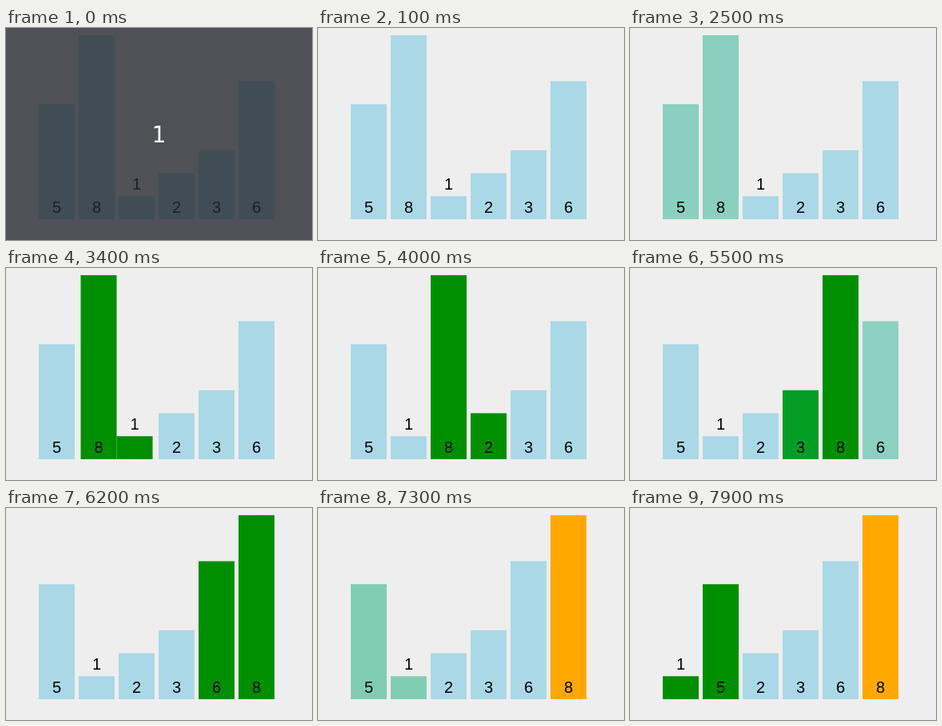
These frames come from a looping animation (383 px wide and 265 px high, 8 s). An HTML page:

```html
<!DOCTYPE html>
<html lang="en">
<head>
<meta charset="utf-8">
<title>Bubble sort</title>
<style>
  html, body { margin: 0; width: 100%; height: 100%; overflow: hidden; background: #eee; }
  svg { display: block; width: 383px; height: 265px; }
  text { text-anchor: middle; }
  .bar text { font: 20px "Liberation Sans", Arial, sans-serif; }
  #veil rect { fill: rgba(38, 40, 46, .79); }
  #veil text { font: 28px "DejaVu Sans", sans-serif; fill: #fff; }
</style>
</head>
<body>
<svg viewBox="0 0 383 265">
  <g id="bars"></g>
  <g id="veil">
    <rect width="383" height="265"/>
    <text x="191.5" y="143">1</text>
  </g>
</svg>
<script>
const LOOP = 8000, STEP = 100, FADE = 250;
const LEFT = 41, PITCH = 50, WIDTH = 45, FLOOR = 239, UNIT = 28.75;
const values = [5, 8, 1, 2, 3, 6];

// Each step names bars by value: on = compared, off = released, swap = trade places.
const steps = [
  { at: 2413, on: [5, 8] },
  { at: 2903, on: [1], off: [5], time: 200 },
  { at: 3342, swap: [8, 1] },
  { at: 3715, on: [2], off: [1] },
  { at: 4180, swap: [8, 2] },
  { at: 4670, on: [3], off: [2] },
  { at: 5040, swap: [8, 3] },
  { at: 5415, on: [6], off: [3] },
  { at: 5935, swap: [8, 6] },
  { at: 6320, off: [6], done: [8] },
  { at: 7205, on: [5, 1] },
  { at: 7640, swap: [5, 1] }
];

const clamp = p => Math.min(1, Math.max(0, p));
const ease = p => p < .5 ? 4 * p ** 3 : 1 - 4 * (1 - p) ** 3;
const mix = (a, b, p) => a + (b - a) * p;

function make(tag, attrs, parent) {
  const el = document.createElementNS("http://www.w3.org/2000/svg", tag);
  for (const key in attrs) el.setAttribute(key, attrs[key]);
  return parent.appendChild(el);
}

const nodes = new Map(values.map(v => {
  const g = make("g", { class: "bar" }, document.getElementById("bars"));
  const h = v * UNIT;
  const rect = make("rect", { y: FLOOR - h, width: WIDTH, height: h }, g);
  const y = v > 1 ? 231 : 202;
  make("text", { x: WIDTH / 2, y }, g).textContent = v;
  return [v, { g, rect }];
}));

// Light blue to green (heat), then to orange (done).
function paint(heat, done) {
  const blend = [
    171 * Math.max(0, 1 - 1.15 * heat),
    216 - 46 * heat - 27 * heat * heat,
    230 * (1 - heat)
  ];
  const rgb = blend.map((c, i) => Math.round(mix(c, [255, 169, 0][i], done)));
  return `rgb(${rgb})`;
}

function draw(t) {
  const bars = new Map(values.map((v, i) => [v, { slot: i, heat: 0, done: 0 }]));
  for (const { at, on = [], off = [], done = [], swap, time = FADE } of steps) {
    if (t <= at) break;
    const p = ease(clamp((t - at) / time));
    for (const v of on) bars.get(v).heat = p;
    for (const v of off) bars.get(v).heat = 1 - p;
    for (const v of done) bars.get(v).done = p;
    if (swap) {
      const [a, b] = swap.map(v => bars.get(v));
      [a.slot, b.slot] = [mix(a.slot, b.slot, p), mix(b.slot, a.slot, p)];
    }
  }
  for (const [v, { slot, heat, done }] of bars) {
    const { g, rect } = nodes.get(v);
    g.setAttribute("transform", `translate(${LEFT + PITCH * slot} 0)`);
    rect.setAttribute("fill", paint(heat, done));
  }
  document.getElementById("veil").style.display = t < STEP ? "" : "none";
}

const start = performance.now();
function tick() {
  const t = (performance.now() - start) % LOOP;
  draw(Math.floor(t / STEP) * STEP);
  requestAnimationFrame(tick);
}
tick();
</script>
</body>
</html>
```
